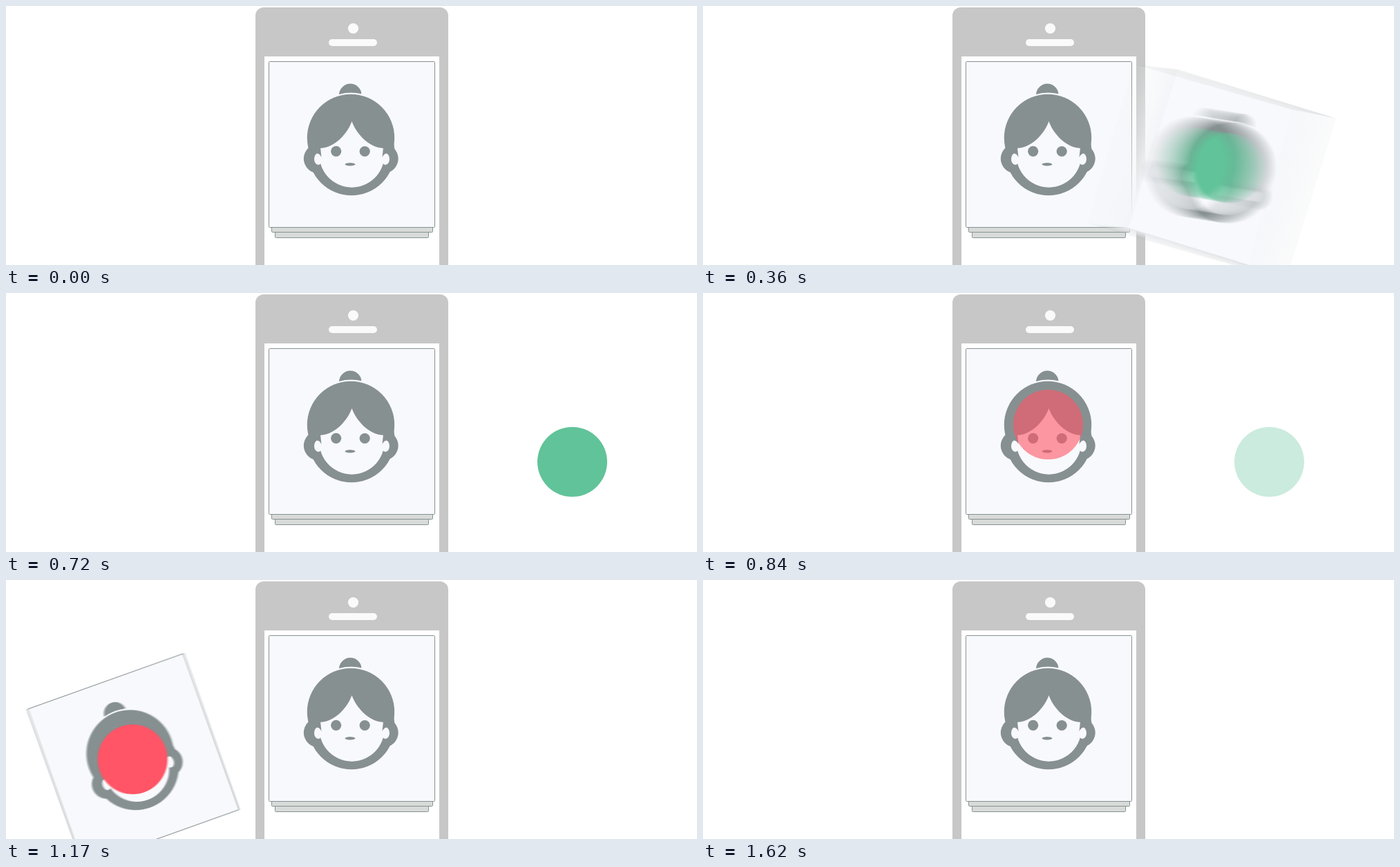
Animation, 1000 px wide and 375 px high, one loop 2.72 s. Source, as an HTML page with a canvas:

```html
<!DOCTYPE html>
<html lang="en">
<head>
<meta charset="utf-8">
<title>Swipe cards</title>
<style>
  html, body { margin: 0; width: 100%; height: 100%; overflow: hidden; background: #fff; }
  canvas { display: block; }
</style>
</head>
<body>
<canvas id="stage" width="1000" height="375"></canvas>
<script>
const W = 1000, H = 375, LOOP = 2720, STEP = 30;
const INK = '#879091', PAPER = '#f8f9fc', EDGE = '#879293';
const FADE_IN = 150, MOVE = 300, FADE_OUT = 180, SHUTTER = 15;
const CARD = [500.5, 200.5], SPOT = [499.5, 190.5];

const swipes = [
  { color: '#61c399', start: 0, out: 540, dx: 320, cardDy: 50, spotDy: 54, turn: 20 },
  { color: '#ff5566', start: 750, out: 1260, dx: -320, cardDy: 60, spotDy: 70, turn: -20 }
];

const clamp = v => Math.min(1, Math.max(0, v));
const smooth = v => v * v * (3 - 2 * v);

// Cubic ease with flat ends; x1 and x2 are the handle lengths
function easing(x1, x2) {
  return t => {
    if (t <= 0 || t >= 1) return clamp(t);
    let lo = 0, hi = 1, s = .5;
    for (let i = 0; i < 24; i++) {
      s = (lo + hi) / 2;
      const x = 3 * (1 - s) * (1 - s) * s * x1 + 3 * (1 - s) * s * s * x2 + s * s * s;
      if (x < t) lo = s; else hi = s;
    }
    return smooth(s);
  };
}
const glide = easing(1, .4), spin = easing(.4, .55);

function ellipse(c, fill, x, y, rx, ry = rx) {
  c.fillStyle = fill;
  c.beginPath();
  c.ellipse(x, y, rx, ry, 0, 0, 7);
  c.fill();
}

function box(c, fill, x, y, w, h, r, stroke) {
  c.fillStyle = fill;
  c.beginPath();
  c.roundRect(x, y, w, h, r);
  c.fill();
  if (stroke) {
    c.strokeStyle = stroke;
    c.lineWidth = 1;
    c.stroke();
  }
}

const bun = new Path2D('M482 128A16.3 16.3 0 0 1 514.5 127.3Q498 123.5 482 128Z');
const skin = new Path2D('M500.5 167C495 183 477 205 454.5 206A47 47 0 1 0 546.5 206C524 205 506 183 500.5 167Z');
const lock = new Path2D('M448 205H455L456.5 219Q454 213 448 213Z');

function drawHead(c) {
  c.fillStyle = INK;
  c.fill(bun);
  ellipse(c, INK, 499, 191, 63.2);
  ellipse(c, INK, 500, 211.8, 62.5);
  ellipse(c, INK, 452, 221, 21.2);
  ellipse(c, INK, 546.5, 221, 21.2);
  c.fillStyle = PAPER;
  c.fill(skin);
  ellipse(c, PAPER, 452, 221.5, 6, 8.5);
  ellipse(c, PAPER, 549, 221.5, 6, 8.5);
  c.fillStyle = INK;
  c.fill(lock);
  c.save();
  c.translate(1001, 0);
  c.scale(-1, 1);
  c.fill(lock);
  c.restore();
  ellipse(c, INK, 477.7, 210.3, 7.6);
  ellipse(c, INK, 519.2, 210.5, 7.6);
  ellipse(c, INK, 498, 229.2, 7.5, 2.2);
}

function drawCard(c) {
  box(c, PAPER, 380.5, 80.5, 240, 240, 1, EDGE);
  drawHead(c);
}

function drawPhone(c) {
  box(c, '#c7c7c7', 361, 2, 279, 400, 12);
  ellipse(c, '#fafafa', 502.5, 32.5, 7.6);
  box(c, '#fafafa', 467, 48, 70, 10, 5);
  box(c, '#fff', 374, 73, 253, 320, 0);
  box(c, '#d8dbd9', 389.5, 300.5, 222, 35, 1, EDGE);
  box(c, '#d8dbd9', 384.5, 300.5, 233, 27, 1, EDGE);
  drawCard(c);
}

function drawSwipe(c, t, s) {
  const spotOut = s.out + FADE_OUT;
  if (t <= s.start || t >= spotOut + FADE_OUT) return;
  const moveStart = s.start + FADE_IN;
  const p = (t - moveStart) / MOVE, k = glide(p);
  if (p > 0 && t < spotOut) {
    c.save();
    c.globalAlpha = 1 - smooth(clamp((t - s.out) / FADE_OUT));
    c.translate(CARD[0] + s.dx * k, CARD[1] + s.cardDy * k);
    c.rotate(s.turn * spin(p) * Math.PI / 180);
    c.translate(-CARD[0], -CARD[1]);
    if (c.globalAlpha < 1) c.drawImage(cardImage, 370, 70);
    else drawCard(c);
    c.restore();
  }
  c.globalAlpha = clamp((t - s.start) / FADE_IN) * (1 - clamp((t - spotOut) / FADE_OUT));
  ellipse(c, s.color, SPOT[0] + s.dx * k, SPOT[1] + s.spotDy * k, 50.5);
  c.globalAlpha = 1;
}

function drawScene(c, t) {
  c.drawImage(phoneImage, 0, 0);
  for (const s of swipes) drawSwipe(c, t, s);
}

function surface(w = W, h = H) {
  const canvas = document.createElement('canvas');
  canvas.width = w;
  canvas.height = h;
  return canvas.getContext('2d');
}

// Flattened card, so that it fades as one layer
const cardLayer = surface(261, 261), cardImage = cardLayer.canvas;
cardLayer.translate(-370, -70);
drawCard(cardLayer);

const phoneLayer = surface(), phoneImage = phoneLayer.canvas;
phoneLayer.fillStyle = '#fff';
phoneLayer.fillRect(0, 0, W, H);
drawPhone(phoneLayer);

// Motion blur: average the two halves of the exposure, recursively
const DEPTH = 5;
const layers = Array.from({ length: DEPTH + 1 }, () => surface());

function expose(level, t, span) {
  const c = layers[level];
  if (!level) {
    drawScene(c, t);
    return c.canvas;
  }
  c.drawImage(expose(level - 1, t - span / 4, span / 2), 0, 0);
  const second = expose(level - 1, t + span / 4, span / 2);
  c.globalAlpha = .5;
  c.drawImage(second, 0, 0);
  c.globalAlpha = 1;
  return c.canvas;
}

const stage = document.getElementById('stage').getContext('2d');
const begin = performance.now();
let shown = -1;

function tick() {
  const now = Math.max(0, performance.now() - begin) % LOOP;
  const t = Math.floor(now / STEP) * STEP;
  if (t !== shown) {
    const moving = swipes.some(s => {
      const m = t - s.start - FADE_IN;
      return m > 0 && m <= MOVE;
    });
    stage.drawImage(expose(moving ? DEPTH : 0, t, SHUTTER), 0, 0);
    shown = t;
  }
  requestAnimationFrame(tick);
}
tick();
</script>
</body>
</html>
```
